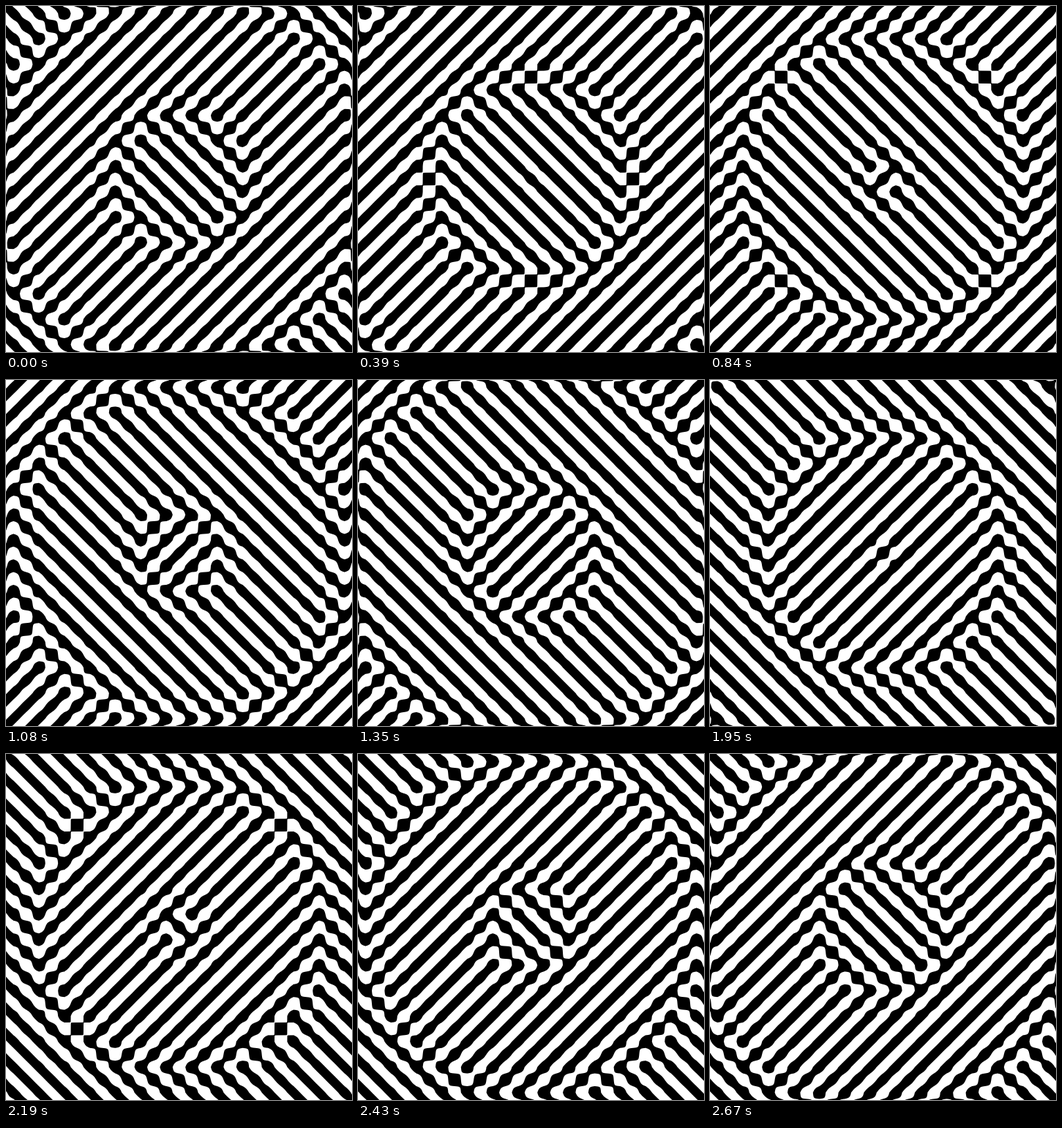
Animation of 500 by 500 pixels, one loop 2700 ms. Source, as an HTML page with a canvas:

```html
<!DOCTYPE html>
<html lang="en">
<head>
<meta charset="utf-8">
<title>Ripple weave</title>
<style>
  html, body { margin: 0; width: 100%; height: 100%; overflow: hidden; background: #fff; }
  canvas { display: block; width: 500px; height: 500px; }
</style>
</head>
<body>
<canvas id="stage" width="500" height="500"></canvas>
<script>
  const SIZE = 500;
  const CELL = 18.4;          // side of one checker square
  const TILE = 2 * CELL;      // every tile blends its two diagonals on its own
  const HALF_WAVE = 10.1 / 2; // half wavelength of the ripple, in tiles
  const LOOP = 2700;
  const STEP = 30;
  const REACH = Math.ceil(SIZE / 2 / TILE);
  const SPAN = 2 * REACH + 1;

  const ctx = document.getElementById('stage').getContext('2d');
  const image = ctx.createImageData(SIZE, SIZE);
  const pixels = new Uint32Array(image.data.buffer);

  // The grid is centred and square, so one axis serves both directions.
  const k = Math.PI / CELL;
  const cos = new Float64Array(SIZE);
  const sin = new Float64Array(SIZE);
  const tile = new Int32Array(SIZE);
  for (let i = 0; i < SIZE; i++) {
    const p = i + 0.5 - SIZE / 2;
    cos[i] = Math.cos(k * p);
    sin[i] = Math.sin(k * p);
    tile[i] = Math.round(p / TILE) + REACH;
  }

  const slant = new Float64Array(SPAN * SPAN);

  // 1 leans every tile one way, -1 the other, 0 is a plain checkerboard.
  function setSlants(time) {
    const phase = 2 * Math.PI * time / LOOP;
    for (let row = 0; row < SPAN; row++) {
      for (let col = 0; col < SPAN; col++) {
        const r = Math.hypot(col - REACH, row - REACH);
        slant[row * SPAN + col] = Math.cos(phase - Math.PI * r / HALF_WAVE);
      }
    }
  }

  function draw(time) {
    setSlants(time);
    for (let y = 0, n = 0; y < SIZE; y++) {
      const cy = cos[y], sy = sin[y], row = tile[y] * SPAN;
      for (let x = 0; x < SIZE; x++, n++) {
        const cx = cos[x], sx = sin[x], m = slant[row + tile[x]];
        const f = cx * cy + m * sx * sy;
        const gx = m * cx * sy - sx * cy;
        const gy = m * sx * cy - cx * sy;
        // signed distance to the outline in pixels gives a soft edge
        const d = f / (k * Math.sqrt(gx * gx + gy * gy) + 1e-6);
        const v = d >= 0.5 ? 0 : d <= -0.5 ? 255 : Math.round(255 * (0.5 - d));
        pixels[n] = 0xff000000 | v << 16 | v << 8 | v;
      }
    }
    ctx.putImageData(image, 0, 0);
  }

  let shown = -1;
  function tick(now) {
    const time = Math.floor((now + 0.01) % LOOP / STEP) * STEP;
    if (time !== shown) draw(shown = time);
    requestAnimationFrame(tick);
  }
  draw(shown = 0);
  requestAnimationFrame(tick);
</script>
</body>
</html>
```
